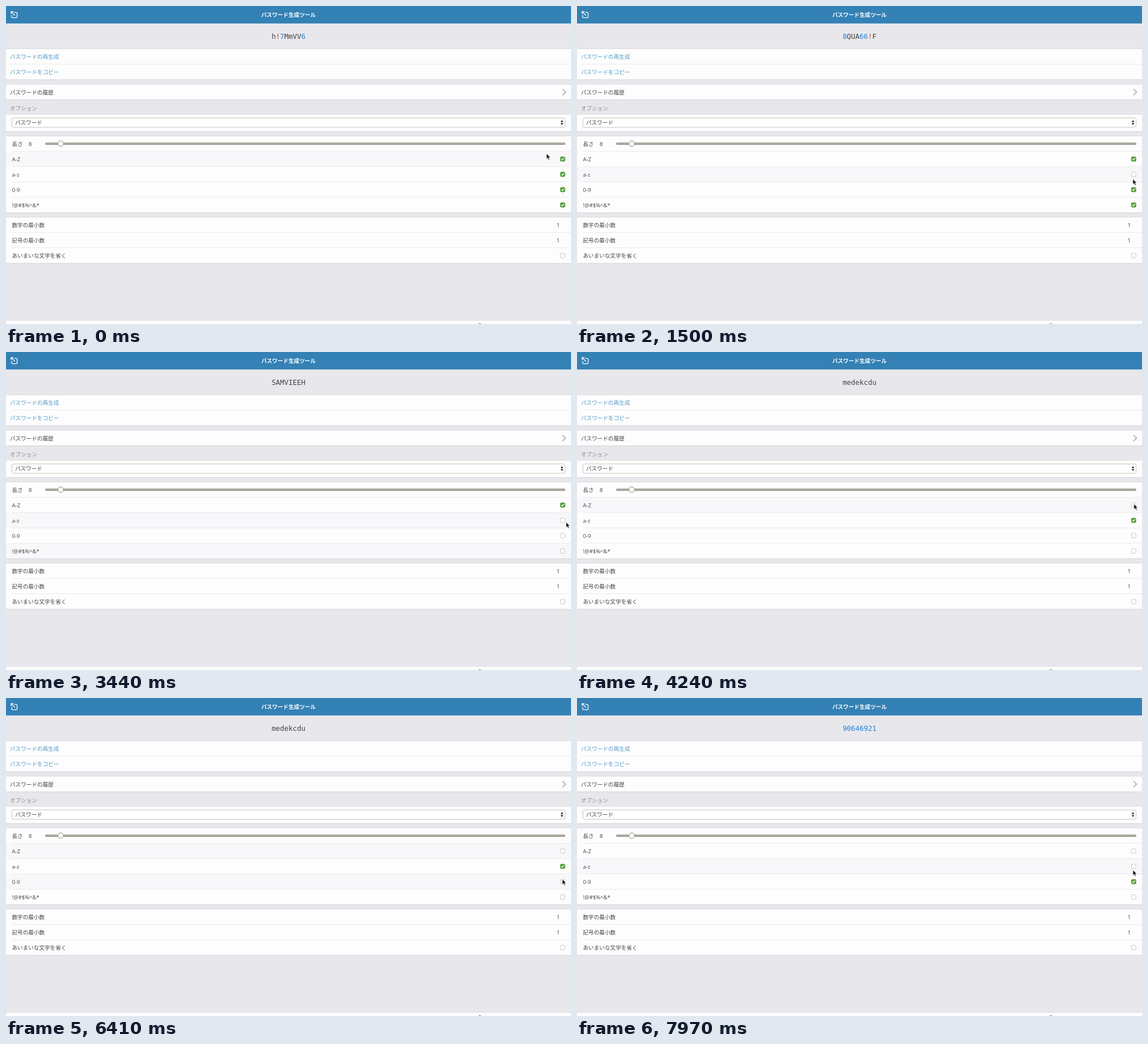
Write an HTML page that moves like this. It is 998 px wide and 561 px high and loops after 8000 ms.

```html
<!DOCTYPE html>
<html lang="ja">
<head>
<meta charset="utf-8">
<style>
  html, body { margin: 0; width: 100%; height: 100%; overflow: hidden; background: #e8e8ec; }
  svg { display: block; width: 998px; height: 561px; }
  text { font: 9.65px "Open Sans", "Noto Sans CJK JP", "Noto Sans CJK", sans-serif; fill: #444; }
  .title { font-weight: 700; fill: #fff; text-anchor: middle; }
  .link text { fill: #509cc8; }
  .caption { fill: #8a8a90; }
  #password { font: 12.4px "DejaVu Sans Mono", monospace; text-anchor: middle; }
  .digit { fill: #2680d6; }
  .symbol { fill: #c62a2a; }
</style>
</head>
<body>
<svg viewBox="0 0 998 561">
  <rect width="998" height="561" fill="#e8e8ec"/>
  <rect width="998" height="30.8" fill="#3481b5"/>
  <g fill="none" stroke="#fff" stroke-width="1.3" stroke-linejoin="round">
    <path d="M14.5 11.3H18.2Q19.6 11.3 19.6 12.7V19.2Q19.6 20.6 18.2 20.6H11.4Q10 20.6 10 19.2V16"/>
    <path d="M15.8 16.7L9.3 10.2M9 14V9.8H13.3"/>
  </g>
  <text class="title" x="499" y="18.5">パスワード生成ツール</text>
  <text id="password" x="499" y="57.5"></text>
  <g id="panels"></g>
  <text class="caption" x="7" y="183.6">オプション</text>
  <path d="M983 146.8L988.5 152L983 157.2" fill="none" stroke="#b9b9b9" stroke-width="2"/>
  <rect x="10.5" y="197.5" width="977" height="16.5" rx="3" fill="#fff" stroke="#c3c3bd"/>
  <path d="M979.7 204.7L982 201.2L984.3 204.7ZM979.7 206.6H984.3L982 210.1Z" fill="#222"/>
  <text x="16" y="209">パスワード</text>
  <text x="40" y="246.6">8</text>
  <rect x="69.5" y="241.5" width="918" height="3" rx="1.5" fill="#b2b2a8" stroke="#909088"/>
  <circle cx="96.6" cy="242.8" r="5" fill="#f6f6f3" stroke="#909088"/>
  <text x="972.5" y="389.6">1</text>
  <text x="972.5" y="416.6">1</text>
  <g id="checks"></g>
  <path d="M834.5 561.3Q837 559.5 839.5 561.3" fill="none" stroke="#555"/>
  <path id="cursor" d="M0 0V9.6L2.2 7.6L3.8 11.2L5.5 10.4L3.9 7H6.9Z" fill="#111" stroke="#fff" stroke-width=".7"/>
</svg>
<script>
const LOOP = 8000, ROW = 27, FIRST_ROW = 256.5, CLICK_DELAY = 130;
const byId = id => document.getElementById(id);
const rowCenter = row => FIRST_ROW + (row + .5) * ROW;

const rect = (y, height, fill, extra = "") =>
  `<rect y="${y}" width="998" height="${height}" fill="${fill}" ${extra}/>`;
const line = (x, y, color) => `<path d="M${x} ${y}H998" stroke="${color}"/>`;

function panel(top, inset, labels, { height = labels.length * ROW + .5, style = "", under = "" } = {}) {
  const rows = labels.map((label, i) =>
    (i ? line(inset, top + i * ROW, "#e9e9ed") : "") +
    `<text x="${inset}" y="${top + i * ROW + 17.6}">${label}</text>`).join("");
  return `<g class="${style}">${rect(top, height, "#fdfdfd")}${under}
    ${line(0, top, "#dcdce0")}${line(0, top + height, "#d3d3d7")}${rows}</g>`;
}

const hoverRows = [0, 1, 2, 3].map(row =>
  rect(FIRST_ROW + row * ROW, ROW, "#f8f8fa", 'class="hover"')).join("");

byId("panels").innerHTML =
  panel(75.5, 7, ["パスワードの再生成", "パスワードをコピー"], { style: "link" }) +
  panel(138, 7, ["パスワードの履歴"]) +
  panel(191, 0, [], { height: 30.5 }) +
  panel(229.3, 10.5, ["長さ", "A-Z", "a-z", "0-9", "!@#$%^&amp;*"], { under: hoverRows }) +
  panel(372.5, 10.5, ["数字の最小数", "記号の最小数", "あいまいな文字を省く"]) +
  panel(554.5, 0, [], { height: 8 });

const checkbox = (y, tick) => `<g transform="translate(983.3 ${y})">
  <rect x="-4" y="-4" width="8" height="8" rx="1.8" fill="#fdfdfd" stroke="#c6c6d0"/>${tick}</g>`;
const greenTick = `<g class="tick"><rect x="-4.3" y="-4.3" width="8.6" height="8.6" rx="2" fill="#559f35"/>
  <path d="M-2.2 0L-.6 1.8L2.3 -2" fill="none" stroke="#fff" stroke-width="1.3"/></g>`;
byId("checks").innerHTML =
  [0, 1, 2, 3].map(row => checkbox(rowCenter(row), greenTick)).join("") + checkbox(440.3, "");

// Cursor visits to checkboxes; those with a password click there
const visits = [
  { row: 1, arrive: 1020, travel: 1000, password: "8QUA66!F" },
  { row: 2, arrive: 1850, travel: 600, password: "^%$UNC!N" },
  { row: 3, arrive: 2270, travel: 270, password: "SAMVIEEH" },
  { row: 0, arrive: 4000, travel: 1300, password: "medekcdu" },
  { row: 1, arrive: 5080, travel: 600 },
  { row: 2, arrive: 6600, travel: 1000, password: "k4t92w7e" },
  { row: 1, arrive: 7200, travel: 400, password: "90646921" },
  { row: 2, arrive: 8600, travel: 1000 }
];

function formAt(time) {
  const form = { password: "h!7MmVV6", checked: [true, true, true, true], active: -1 };
  for (const { row, arrive, password } of visits) {
    if (!password || time < arrive + CLICK_DELAY) continue;
    form.password = password;
    form.active = row;
    form.checked[row] = !form.checked[row];
    // Lowercase switches on when nothing else is left
    if (!form.checked.includes(true)) form.checked[1] = true;
  }
  return form;
}

function cursorAt(time) {
  let x = 954.8, y = 260.3;
  for (const { row, arrive, travel } of visits) {
    const p = Math.min(1, (time - arrive + travel) / travel);
    if (p <= 0) break;
    const ease = p * p * (3 - 2 * p), dy = rowCenter(row) - 2 - y;
    x += (983.7 - x) * ease - .07 * dy * Math.sin(Math.PI * p);
    y += dy * ease;
  }
  return [x, y];
}

const ticks = document.querySelectorAll(".tick");
const hovers = document.querySelectorAll(".hover");
const show = (node, on) => node.setAttribute("visibility", on ? "visible" : "hidden");
const charClass = c => /\d/.test(c) ? "digit" : /[a-z]/i.test(c) ? "" : "symbol";

function draw(time) {
  const { password, checked, active } = formAt(time);
  const [x, y] = cursorAt(time);
  const hovered = Math.floor((y - FIRST_ROW) / ROW);
  byId("password").innerHTML = [...password].map(c =>
    `<tspan class="${charClass(c)}">${c}</tspan>`).join("");
  ticks.forEach((tick, row) => show(tick, checked[row]));
  hovers.forEach((band, row) => show(band, row === hovered || row === active));
  byId("cursor").setAttribute("transform", `translate(${x} ${y})`);
}

const start = performance.now();
function frame() {
  draw((performance.now() - start) % LOOP);
  requestAnimationFrame(frame);
}
frame();
</script>
</body>
</html>
```
